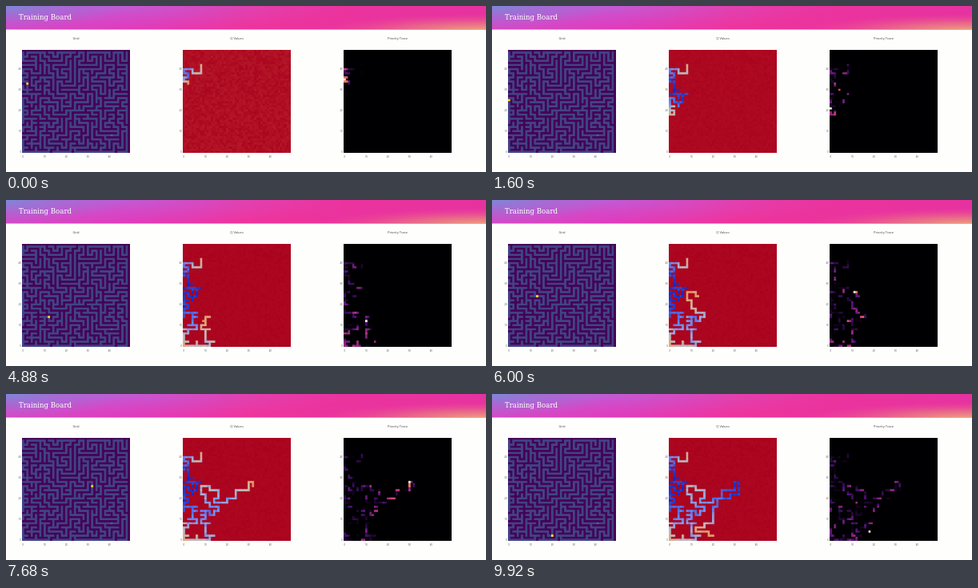
Animation, 600 px wide and 208 px high, one loop 10 s. Source, as an HTML page with a canvas:

```html
<!DOCTYPE html>
<html lang="en">
<head>
<meta charset="utf-8">
<title>Training Board</title>
<style>
  html, body { margin: 0; width: 100%; height: 100%; overflow: hidden; background: #fefefd; }
  canvas, svg { position: absolute; left: 0; top: 0; width: 600px; height: 208px; display: block; }
  text { font-family: "Open Sans", Verdana, sans-serif; fill: #444; }
  .head { font-family: "DejaVu Serif", serif; fill: #fff; font-size: 8.6px; }
  .name { font-size: 4.1px; text-anchor: middle; }
  .tick { font-size: 2.7px; }
</style>
</head>
<body>
<canvas id="maps" width="600" height="208"></canvas>
<svg id="stage" viewBox="0 0 600 208">
  <defs>
    <linearGradient id="base">
      <stop offset="0" stop-color="#d04cc8"/>
      <stop offset=".25" stop-color="#e03abc"/>
      <stop offset=".5" stop-color="#ee349c"/>
      <stop offset="1" stop-color="#e632a0"/>
    </linearGradient>
    <radialGradient id="violet" gradientUnits="userSpaceOnUse" cx="0" cy="0" r="1" gradientTransform="translate(130 0) scale(300 32)">
      <stop offset="0" stop-color="#b864dc" stop-opacity=".85"/>
      <stop offset="1" stop-color="#d84cc8" stop-opacity="0"/>
    </radialGradient>
    <radialGradient id="blue" gradientUnits="userSpaceOnUse" cx="0" cy="0" r="1" gradientTransform="scale(150 28)">
      <stop offset="0" stop-color="#7c88d8"/>
      <stop offset="1" stop-color="#9a70d8" stop-opacity="0"/>
    </radialGradient>
    <radialGradient id="warm" gradientUnits="userSpaceOnUse" cx="0" cy="0" r="1" gradientTransform="translate(600 32) scale(210 22)">
      <stop offset="0" stop-color="#f0b478"/>
      <stop offset=".5" stop-color="#ea8080" stop-opacity=".65"/>
      <stop offset="1" stop-color="#ea5090" stop-opacity="0"/>
    </radialGradient>
  </defs>
  <rect width="600" height="29.5" fill="url(#base)"/>
  <rect width="600" height="29.5" fill="url(#violet)"/>
  <rect width="600" height="29.5" fill="url(#blue)"/>
  <rect width="600" height="29.5" fill="url(#warm)"/>
  <text class="head" x="16" y="17.3">Training Board</text>
</svg>
<script>
const N = 50, TOP = 54.5, W = 135, H = 129.5;
const left = panel => 20 + 201 * panel;

const stage = document.getElementById('stage');
function label(cls, x, y, str, anchor) {
  const el = document.createElementNS('http://www.w3.org/2000/svg', 'text');
  el.setAttribute('class', cls);
  el.setAttribute('x', x);
  el.setAttribute('y', y);
  if (anchor) el.setAttribute('text-anchor', anchor);
  el.textContent = str;
  stage.append(el);
}
['Grid', 'Q Values', 'Priority Trace'].forEach((name, i) => {
  label('name', left(i) + W / 2, 42.3, name);
  for (let v = 0; v < N; v += 10) {
    label('tick', left(i) + (v + .5) * W / N, 189.5, v, 'middle');
    label('tick', left(i) - 1.3, TOP + H - (v + .5) * H / N + 1, v, 'end');
  }
});

function hash(x, y, z) {
  let h = Math.imul(x + 11, 374761393) ^ Math.imul(y + 7, 668265263) ^ Math.imul(z + 3, 1274126177);
  h = Math.imul(h ^ h >>> 13, 1103515245);
  h = Math.imul(h ^ h >>> 15, 2246822519);
  return ((h ^ h >>> 16) >>> 0) / 4294967296;
}

function lerpKeys(xs, ys, x) {
  let i = 0;
  while (i < xs.length - 2 && x > xs[i + 1]) i++;
  const f = Math.max(0, Math.min(1, (x - xs[i]) / (xs[i + 1] - xs[i])));
  return ys[i] + (ys[i + 1] - ys[i]) * f;
}

const channels = hex => [1, 3, 5].map(i => parseInt(hex.slice(i, i + 2), 16));
function ramp(at, hexes) {
  const stops = hexes.map(channels);
  return v => [0, 1, 2].map(k => lerpKeys(at, stops.map(s => s[k]), v));
}
const rdbu = ramp([0, .35, .5, .6, .7, 1], ['#050aac', '#6a89f7', '#bebebe', '#dcaa84', '#e6915a', '#aa021e']);
const magma = ramp([0, .25, .5, .75, 1], ['#000002', '#4f127b', '#b5367a', '#fb8761', '#fcfddc']);

// each hop runs along x first, then along y; "|" ends a leg
const route = '8,42 8,38 4,40 0,38 2,36 0,34 2,33|2,28 6,24 2,26 0,20 2,18 0,25|' +
  '0,16 4,10 6,8 2,6 0,0|12,2 10,8 8,10 10,14 12,14|' +
  '12,12 14,14 16,16 12,18 10,22 8,26 12,24 13,24|' +
  '16,20 14,18 20,20 24,24 30,28 32,26|32,22 28,20 22,16 20,8 16,6 12,4 18,2 20,2';
const times = [-60, 0, 24, 49, 73, 90, 115, 149];   // step at each leg end
const levels = [.6, .12, .12, .55, .3, .5, .08, .62]; // Q level settled at there

const walk = [[8, 42]], marks = [0];
for (const leg of route.split('|')) {
  for (const hop of leg.split(' ')) {
    const [x, y] = hop.split(',').map(Number);
    let [a, b] = walk[walk.length - 1];
    while (a !== x || b !== y) {
      if (a !== x) a += Math.sign(x - a); else b += Math.sign(y - b);
      walk.push([a, b]);
    }
  }
  marks.push(walk.length - 1);
}

const id = (x, y) => y * N + x;
const open = new Uint8Array(N * N);
const seen = new Float64Array(N * N).fill(1e9);
const level = new Float64Array(N * N);

function visit(x, y, n, q) {
  const i = id(x, y);
  open[i] = 1;
  if (n < seen[i]) { seen[i] = n; level[i] = q; }
}
walk.forEach(([x, y], i) => visit(x, y, lerpKeys(marks, times, i), lerpKeys(marks, levels, i)));

const freeSides = (x, y) => [[1, 0], [-1, 0], [0, 1], [0, -1]].filter(([a, b]) => {
  const u = x + 2 * a, v = y + 2 * b;
  return u >= 0 && v >= 0 && u < N && v < N && !open[id(u, v)];
});
const isNode = ([x, y]) => x % 2 === 0 && y % 2 === 0;

// short dead ends tried along the way
for (const [x, y] of walk.slice(marks[1], marks[4]).filter(isNode)) {
  const sides = freeSides(x, y);
  if (!sides.length || hash(x, y, 2) > .4) continue;
  const [a, b] = sides[0], i = id(x, y);
  for (const k of [1, 2]) visit(x + k * a, y + k * b, seen[i] + 2 * k, level[i]);
}

// depth-first maze around the walk
const stack = walk.filter(isNode);
while (stack.length) {
  const [x, y] = stack[stack.length - 1];
  const sides = freeSides(x, y);
  if (!sides.length) { stack.pop(); continue; }
  const [a, b] = sides[Math.floor(hash(x, y, stack.length) * sides.length)];
  open[id(x + a, y + b)] = open[id(x + 2 * a, y + 2 * b)] = 1;
  stack.push([x + 2 * a, y + 2 * b]);
}
const goal = id(41, 8);

const tones = ['#440154', '#414487', '#2a788e', '#fde725'].map(channels);
const gridColour = (i, agent) => tones[i === agent ? 3 : i === goal ? 2 : open[i]];

function qValue(x, y, i, n) {
  if (seen[i] > n) return 1 - .04 * Math.exp(-n / 20) * hash(x, y, 5) - .012 * hash(x, y, 6);
  const fresh = Math.max(0, 1 - (n - seen[i]) / 18);
  return level[i] + (.68 - level[i]) * fresh + (hash(x, y, 9) - .5) * .1;
}

// replayed cells flare up in small clusters and cool with age
function traceValue(x, y, i, n) {
  if (seen[i] > n) return 0;
  const bx = x >> 1, by = y >> 1;
  const beat = Math.floor(n / 8 + hash(bx, by, 1));
  const spark = hash(bx, by, beat + 20) ** 3 * (.6 + .4 * hash(x, y, beat));
  return spark * (.45 + .55 * Math.exp(-(n - seen[i]) / 30));
}

function buffer(size) {
  const c = document.createElement('canvas');
  c.width = c.height = size;
  return c.getContext('2d');
}
const view = document.getElementById('maps').getContext('2d');
const small = buffer(N), big = buffer(N * 10);
big.imageSmoothingEnabled = false;
view.imageSmoothingQuality = 'high';
const image = small.createImageData(N, N);

function paint(panel, colour) {
  for (let y = 0; y < N; y++)
    for (let x = 0; x < N; x++)
      image.data.set([...colour(x, y, id(x, y)), 255], 4 * id(x, N - 1 - y));
  small.putImageData(image, 0, 0);
  big.drawImage(small.canvas, 0, 0, N * 10, N * 10);
  view.drawImage(big.canvas, left(panel), TOP, W, H);
}

function draw(n) {
  const step = Math.round(lerpKeys(times, marks, n));
  const agent = id(...walk[step]), head = id(...walk[step - 4]);
  view.clearRect(0, 0, 600, 208);
  paint(0, (x, y, i) => gridColour(i, agent));
  paint(1, (x, y, i) => rdbu(qValue(x, y, i, n)));
  paint(2, (x, y, i) => magma(i === head ? 1 : traceValue(x, y, i, n)));
}

// 15 steps a second, snapped to a 40 ms clock
function stepAt(t) {
  let n = Math.min(149, Math.floor(t * 15 / 1000) + 1);
  while (n > 0 && 40 * Math.round(n * 5 / 3) > t) n--;
  return n;
}

let last = -1;
function tick() {
  const n = stepAt(performance.now() % 10000);
  if (n !== last) draw(last = n);
  requestAnimationFrame(tick);
}
tick();
</script>
</body>
</html>
```
